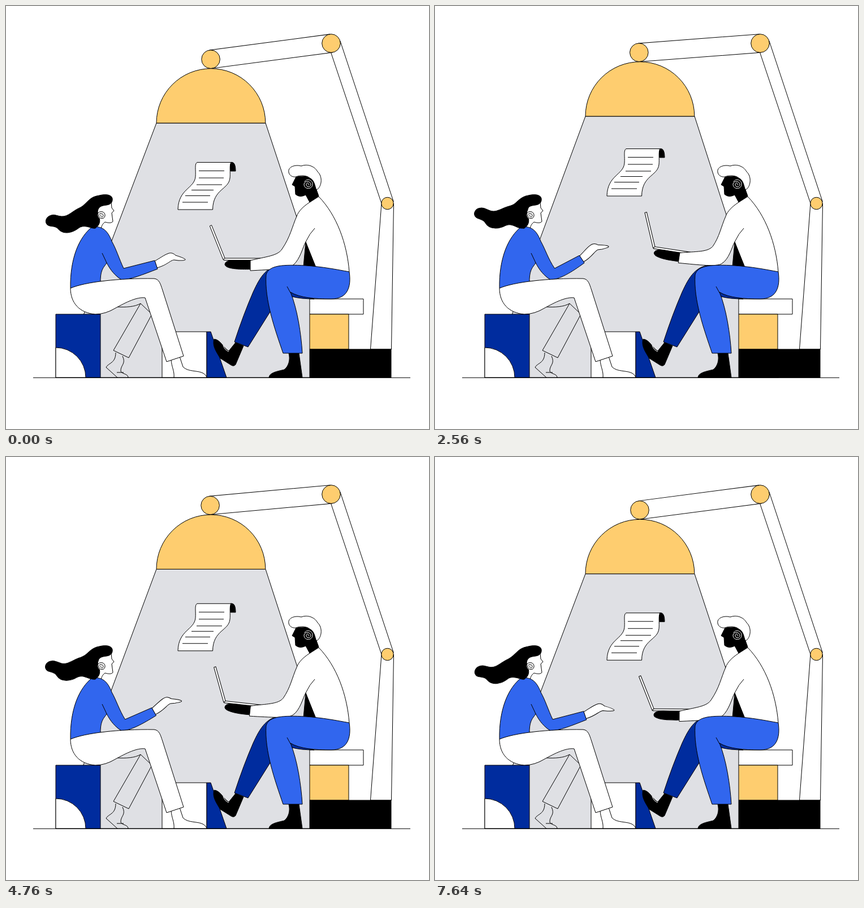
Write an HTML page that moves like this. It is 748 px wide and 748 px high and loops after 7680 ms.

```html
<!DOCTYPE html>
<html lang="en">
<head>
<meta charset="utf-8">
<title>Lamp and two people</title>
<style>
html, body { margin: 0; width: 100%; height: 100%; overflow: hidden; background: #fff; }
svg { display: block; width: 100%; height: 100%; fill: #fff; stroke: #000; stroke-width: 1; stroke-linejoin: round; }
.grey { fill: #dfe0e4; }
.gold { fill: #fecd6f; }
.blue { fill: #3166ee; }
.navy { fill: #002c9e; }
.ink { fill: #000; }
.line { fill: none; }
.chalk { fill: none; stroke: #fff; }
</style>
</head>
<body>
<svg viewBox="0 0 748 748">
  <path id="beam" class="grey"/>

  <!-- lamp stand -->
  <path d="M664 349 644.5 607H681.5L685.5 349Z"/>
  <path d="M575 66 574.5 82 664 349 685.3 346 591 62Z"/>
  <circle class="gold" cx="674.5" cy="349" r="10.7"/>
  <path id="arm" d="M0-16.3H-214.8V16.3H0Z"/>
  <circle class="gold" cx="575" cy="66" r="16.3"/>
  <circle id="knob" class="gold" r="16.3"/>
  <path id="dome" class="gold" d="M266 207A96.4 96.4 0 0 1 458.8 207Z"/>

  <g id="paper">
    <path d="M338 276.5C333 279 336 290 335 302C333 323 305 323 304 360H365.500C366 323 394 325 396 304C397 296 395 284 397.500 276.500Z"/>
    <path class="ink" d="M397 276.500C404 275 406 282 406 292H397C397 286 395 281 399 276.500Z"/>
    <path class="line" d="M341 291.500H386M341 304H385M337 316H382M328 325.500H367M317 335.500H361M312 347H357"/>
  </g>

  <!-- furniture -->
  <path class="navy" d="M88 545H167V657H88Z"/>
  <path d="M88 604A53 53 0 0 1 141 657H88Z"/>
  <path d="M276 576H355V657H276Z"/>
  <path class="navy" d="M355 576H362L390 657H355Z"/>
  <path d="M537 518H632V545H537Z"/>
  <path class="gold" d="M537 545H606V607H537Z"/>
  <path class="ink" d="M537 607H681V657H537Z"/>

  <!-- woman: upper body -->
  <path d="M186 346 187 357 191 362 187 366 189 381C186 385 179 383 175 382C170 386 168 390 168 398L154 396 160 355Z"/>
  <path id="hand" d="M263 451C272 446 280 440 286 438C292 435 297 438 300 441C307 443 315 446 317 448C318 450 312 450 305 450L297 449C290 450 285 458 267 463Z"/>
  <path id="sweater" class="blue"/>
  <path class="grey" d="M178 454C175 461 167 463 167 487L206 485C193 478 184 466 178 454Z"/>
  <path class="line" d="M170 437 178 454"/>
  <path id="tail" class="ink" d="M165 336C148 335 143 351 130 357C118 362 110 373 98 372C89 371 86 368 80 370C72 372 69 379 71 384C75 393 86 386 93 395C102 405 118 401 128 393C138 385 150 394 157 392Z"/>
  <path class="ink" d="M188 340C186 332 172 333 165 335C150 337 143 350 132 357L140 388C148 391 153 394 158 393C165 388 167 382 165 374L162 364C163 354 170 353 178 352C186 351 189 346 188 340Z"/>
  <circle cx="169" cy="370" r="6.500" stroke="none"/>
  <path class="line" d="M163 366C167 361 176 364 175 371C174 378 164 377 164 370C165 365 172 366 172 371C171 375 166 373 168 369"/>

  <!-- woman: legs -->
  <path class="line" d="M194 613C194 632 181 631 177 639L197 657M206 619C213 633 202 635 203 646C205 651 216 650 216 657M196 648H208"/>
  <path class="grey" d="M238 526 190 609 217 622 258 545Z"/>
  <path class="line" d="M196 532C212 533 228 532 238 526"/>
  <path d="M292 626C293 639 298 645 297 657H355C350 641 324 650 313 638L307 620Z"/>
  <path d="M114 499C140 488 200 481 262 482C271 483 273 491 277 503L314 619 284 629 246 516C232 514 212 524 194 534Q176 545 158 545C130 543 114 525 114 499Z"/>

  <!-- man: far leg and laptop -->
  <path class="ink" d="M368 589C380 590 385 606 394 610L406 595 420 601 406 634Q403 638 398 635L379 623C372 612 364 600 368 589Z"/>
  <path class="chalk" d="M384 600Q387 609 394 611"/>
  <path class="navy" d="M495 459C462 454 448 482 437 506Q420 545 404 594L428 603 470 536Z"/>
  <path class="navy" d="M502 506 506 514Q522 518 545 518Z"/>
  <g id="laptop">
    <path d="M385 446H452V449.500H385Z"/>
    <path d="M360.300 389 363.500 387.500 387 446 384 448.500Z"/>
    <path class="ink" d="M387 457C388 449 400 449 415 450H434V465.500C412 466 388 465 387 457Z"/>
  </g>

  <!-- man: body -->
  <path class="ink" d="M530 417 548 461H526Z"/>
  <path stroke="none" d="M553 337C585 370 603 420 607 472L548 461 530 417 520 375Z"/>
  <path class="line" d="M553 337C585 370 603 420 607 470M530 417 547 460"/>
  <path id="sleeve" stroke="none"/>
  <path id="seam" class="line"/>
  <path class="ink" d="M513 302 506 316 511 319 512 333C518 338 524 337 530 334L537 347 553 336 548 322 545 300Z"/>
  <path d="M500 294C498 284 512 280 522 283C535 278 547 285 551 293C561 302 558 321 549 325C546 319 546 308 537 304C531 299 519 299 513 302C507 303 501 300 500 294Z"/>
  <circle class="ink" cx="535" cy="315" r="9" stroke="none"/>
  <path class="chalk" d="M528 311C531 304 543 307 542 316C541 325 527 325 527 315C528 308 539 309 539 316C538 322 530 320 531 315C532 311 537 314 535 317"/>
  <path class="ink" d="M500 614H518L524 657H465C466 648 480 646 492 643C500 637 503 625 500 614Z"/>
  <path class="blue" d="M607 470C611 497 604 518 575 518C545 518 520 516 503 506C515 535 522 580 524 614H490C475 570 457 520 460 475C465 458 490 457 530 459C560 461 585 466 607 470Z"/>
  <path class="line" d="M497 496 503 507"/>

  <path d="M48 657.300H715"/>
</svg>
<script>
const $ = id => document.getElementById(id);
const set = (id, name, value) => $(id).setAttribute(name, value);
const HALF = 1920, STEP = 40, ARM = 214.8;

// Returns a function turning points about (cx, cy) and listing them as path text.
const turner = (deg, cx, cy) => (...pts) => {
  const a = deg * Math.PI / 180, c = Math.cos(a), s = Math.sin(a);
  return pts.map(([x, y]) => {
    const dx = x - cx, dy = y - cy;
    return (cx + dx * c - dy * s).toFixed(2) + ' ' + (cy + dx * s + dy * c).toFixed(2);
  }).join(' ');
};

function draw(now) {
  const t = Math.floor(now / STEP) * STEP % (2 * HALF);
  const p = 1 - Math.abs(t / HALF - 1);

  // lamp
  const rise = 18 * p, base = 207 - rise, drop = 28.2 - rise;
  set('beam', 'd', `M266 ${base}H459L608 657H95Z`);
  set('dome', 'transform', `translate(0 ${-rise})`);
  set('knob', 'cx', 575 - Math.sqrt(ARM * ARM - drop * drop));
  set('knob', 'cy', 66 + drop);
  set('arm', 'transform', `translate(575 66) rotate(${-Math.asin(drop / ARM) * 180 / Math.PI})`);
  set('paper', 'transform', `translate(0 ${-36 * p})`);

  // woman
  const bend = -23 * p, fore = turner(bend, 226, 474);
  set('tail', 'transform', `rotate(${16 * p} 150 370)`);
  set('hand', 'transform', `rotate(${bend} 226 474)`);
  set('sweater', 'd', `M152 391C130 408 113 445 114 499C130 495 165 488 204 484
    C220 484 ${fore([242, 475], [268, 465])}L${fore([263, 450])}L${208 + 5.3 * p} 464
    C200 447 195 430 187 416C180 397 170 388 152 391Z`);

  // man
  const lift = 12.8 * p, limb = turner(lift, 523, 449);
  set('laptop', 'transform', `rotate(${lift} 523 449)`);
  const sleeve = `M553 337 537 347C525 355 517 363 514 372
    C506 390 503 408 ${limb([488, 430])}C${limb([480, 442], [460, 443], [432, 450])}
    L${limb([432, 468])}C${limb([470, 466], [500, 465], [508, 458])}
    C520 448 525 426 530 417Q537 402 546 393`;
  set('sleeve', 'd', sleeve + 'Z');
  set('seam', 'd', sleeve);
}

function loop() {
  draw(performance.now());
  requestAnimationFrame(loop);
}
loop();
</script>
</body>
</html>
```
